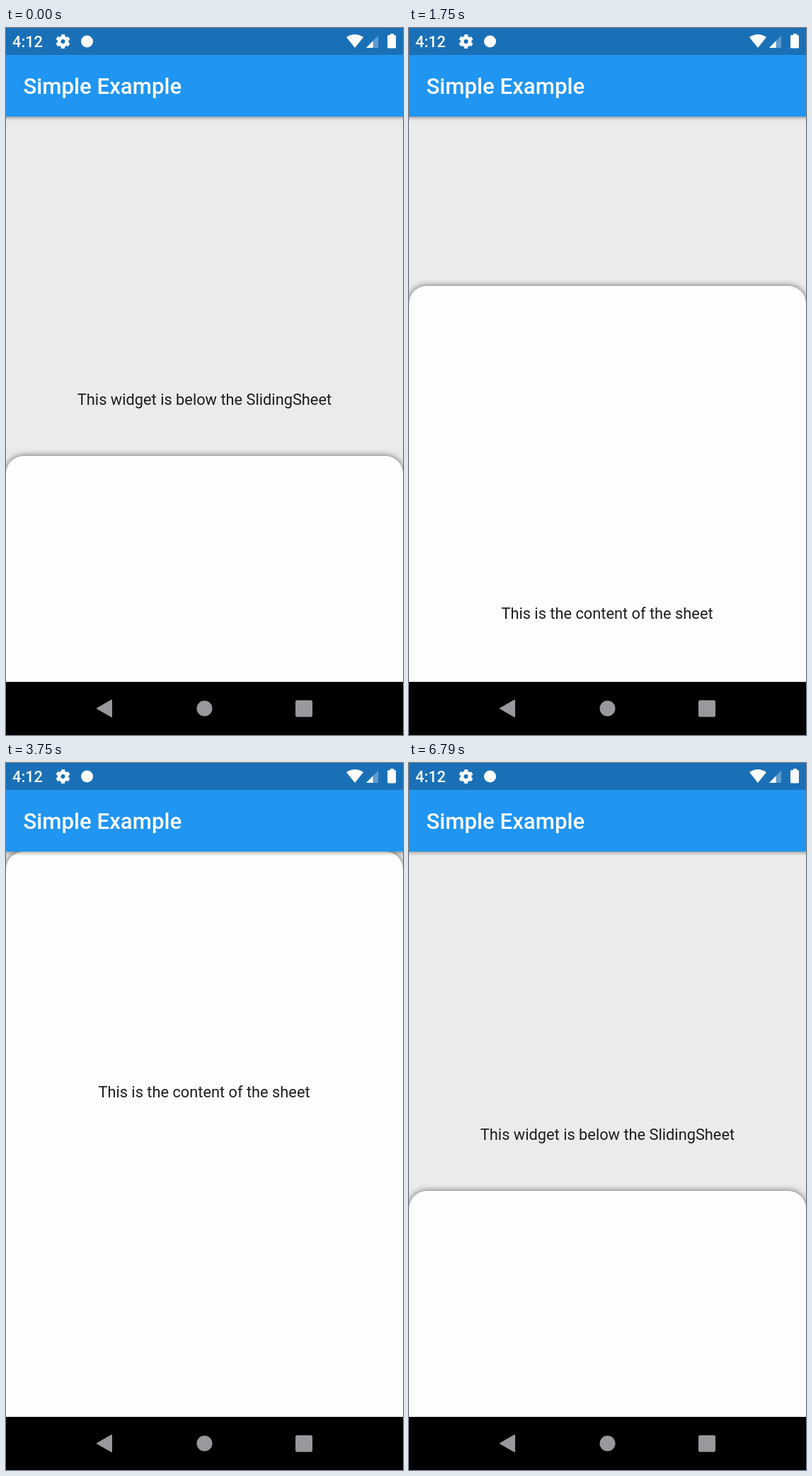
An HTML page for the animation above (7000 ms loop, 561 by 998 pixels).

```html
<!DOCTYPE html>
<html lang="en">
<head>
<meta charset="utf-8">
<title>Sliding sheet</title>
<style>
  html, body { margin: 0; width: 100%; height: 100%; overflow: hidden; }
  svg { display: block; width: 561px; height: 998px; background: #ebebeb; }
  text { font: 21.8px Roboto, sans-serif; fill: #1d1d1f; }
  .bar text { font-weight: 500; fill: #fff; }
  .bar .title { font-size: 31.2px; }
  .label { text-anchor: middle; }
  .panel { fill: #fdfdfd; filter: drop-shadow(0 0 5px rgba(0, 0, 0, .6)); }
  .toolbar { fill: #2095f1; filter: drop-shadow(0 2px 2.5px rgba(0, 0, 0, .35)); }
  .icons { fill: #fff; }
  .gear { fill: none; stroke: #fff; }
  .nav { fill: #99989c; stroke: #99989c; stroke-width: 2; stroke-linejoin: round; }
</style>
</head>
<body>
<svg viewBox="0 0 561 998">
  <text class="label" x="280.5" y="531.5">This widget is below the SlidingSheet</text>

  <g id="sheet">
    <rect class="panel" width="561" height="998" rx="25"/>
    <text class="label" id="content" x="280" y="469.5">This is the content of the sheet</text>
  </g>

  <g class="bar">
    <rect class="toolbar" x="-10" y="-10" width="581" height="135"/>
    <rect width="561" height="38" fill="#1a70b6"/>
    <text class="title" x="24.5" y="93">Simple Example</text>
    <text x="9" y="27">4:12</text>
  </g>

  <g class="gear" transform="translate(80.5 19) rotate(13.5)">
    <circle r="5.5" stroke-width="5"/>
    <circle r="8.7" stroke-width="2.8" stroke-dasharray="5 4.11"/>
  </g>
  <g class="icons">
    <circle cx="114.5" cy="19" r="8.5"/>
    <path d="M493 28L481 13Q493 5 505 13Z"/>
    <path d="M509 28L526 10.5V28Z" opacity=".3"/>
    <path d="M509 28L518.5 18.2V28Z"/>
    <path d="M540.5 10H543V8H548V10H549.5Q551 10 551 11.5V27Q551 28.5 549.5 28.5H540.5Q539 28.5 539 27V11.5Q539 10 540.5 10Z"/>
  </g>

  <rect y="923" width="561" height="75"/>
  <g class="nav">
    <path d="M129 960.5L149 949V972Z"/>
    <circle cx="280.5" cy="960.5" r="10"/>
    <rect x="410" y="950" width="22" height="21.5" rx="1"/>
  </g>
</svg>
<script>
  const LOOP = 7000, FPS = 24;
  const REST_TOP = 604, FULL_TRAVEL = 479;
  const sheet = document.getElementById('sheet');
  const content = document.getElementById('content');

  // Finger travel: [time ms, distance px, speed px/ms]
  const keys = [
    [0, 0, 0], [750, 99, .17], [1580, 240, 0],
    [1750, 240, 0], [2460, 427, .29], [3290, 605, 0],
    [3650, 605, 0], [3750, 602, -.1], [4540, 240, 0],
    [4980, 240, 0], [5210, 55, -.6], [5400, 0, 0], [LOOP, 0, 0]
  ];

  function travel(t) {
    const i = keys.findIndex(key => key[0] > t);
    const [t0, a, va] = keys[i - 1], [t1, b, vb] = keys[i];
    const d = t1 - t0, s = (t - t0) / d, r = 1 - s;
    return r * r * ((1 + 2 * s) * a + s * d * va)
         + s * s * ((3 - 2 * s) * b - r * d * vb);
  }

  function draw(now) {
    const step = Math.floor((now % LOOP + 2) * FPS / 1000);
    const distance = travel(step * 1000 / FPS % LOOP);
    const lift = Math.min(distance, FULL_TRAVEL);
    sheet.setAttribute('transform', `translate(0 ${Math.round(REST_TOP - lift)})`);
    // Travel beyond the fully open sheet scrolls its content
    content.setAttribute('transform', `translate(0 ${Math.round(lift - distance)})`);
    requestAnimationFrame(() => draw(performance.now()));
  }
  draw(0);
</script>
</body>
</html>
```
